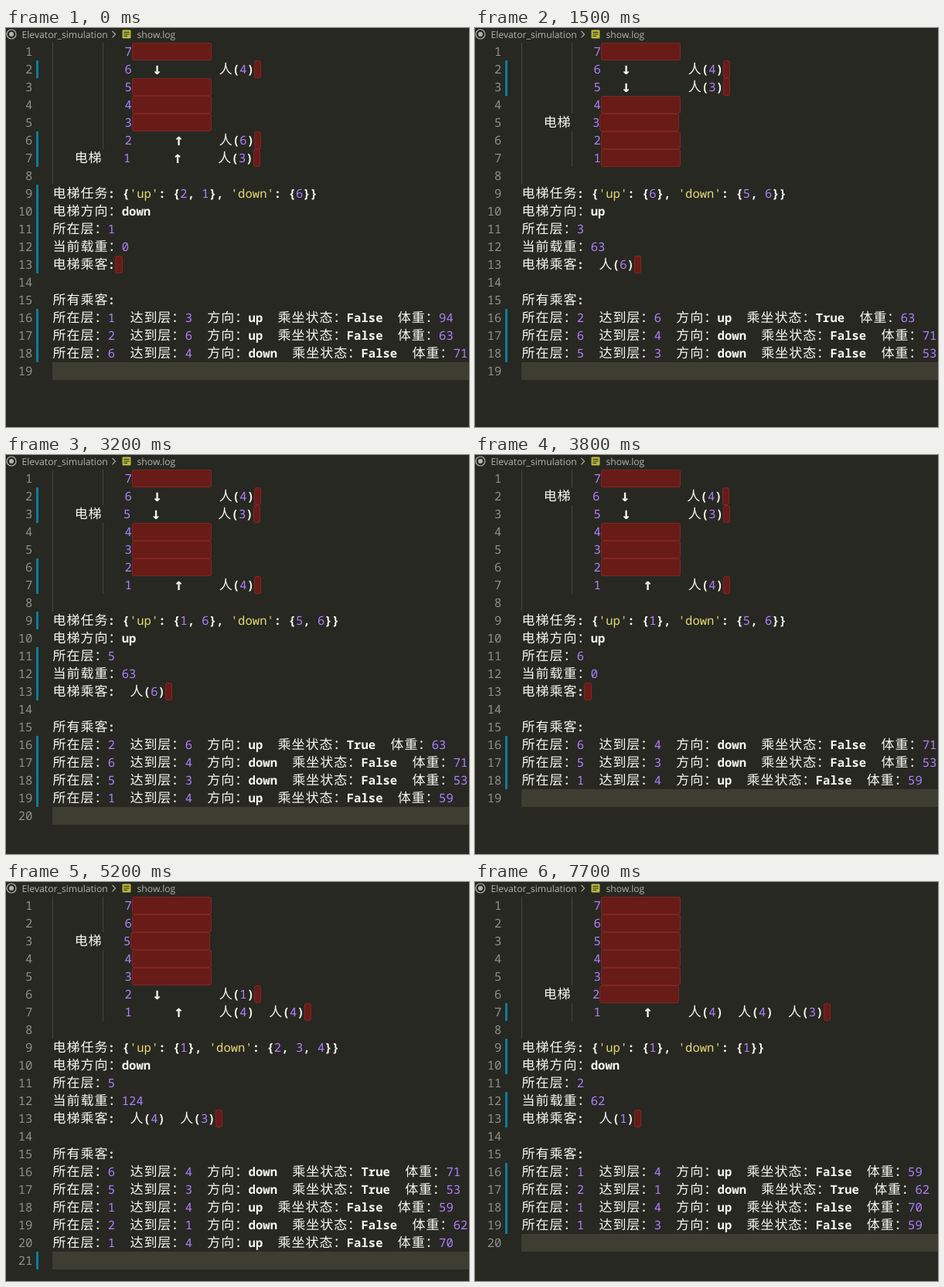
An HTML page that plays this animation: 599x517 px, repeating every 8 s.

```html
<!DOCTYPE html>
<html lang="zh-CN">
<head>
<meta charset="utf-8">
<title>show.log</title>
<style>
  html, body { margin: 0; width: 100%; height: 100%; overflow: hidden; background: #272822; }
  body { position: relative; text-rendering: geometricPrecision; }
  #crumbs { position: absolute; left: 0; top: 0; width: 599px; height: 19px; }
  #crumbs text { font: 12.2px "Open Sans", "Noto Sans", sans-serif; fill: #b4b4af; }
  #editor { position: absolute; left: 0; top: 19px; width: 599px; }
  .row {
    position: relative; height: 23px; line-height: 23px; white-space: pre;
    font-family: "Noto Sans Mono", "DejaVu Sans Mono", monospace; font-size: 15.58px;
    font-variant-ligatures: none; color: #f8f8f2;
  }
  .row > * { position: absolute; top: 0; height: 23px; }
  .num { right: 564.6px; color: #90908a; }
  .text { left: 60px; font-weight: 600; }
  .bar { left: 39px; width: 3px; background: #0c7d9d; }
  .guide { width: 1px; background: #464741; }
  .active { left: 60px; right: 0; background: #3e3d32; }
  .digit { color: #ae81ff; font-weight: 400; }
  .str { color: #e6db74; font-weight: 400; }
  .han {
    font: 300 17px/0 "Noto Sans CJK SC", "Noto Sans Mono CJK SC", "Noto Sans CJK", sans-serif;
    letter-spacing: .95px; position: relative; left: .6px;
  }
  .arrow {
    font: bold 21px/0 "DejaVu Sans Mono", monospace;
    margin: 0 -1.65px; position: relative; top: 1px;
  }
  .trail {
    display: inline-block; box-sizing: border-box; height: 23px; vertical-align: top;
    background: rgba(255, 0, 0, .3); border: 1px solid rgba(255, 100, 100, .15); border-radius: 3px;
  }
</style>
</head>
<body>
<svg id="crumbs" viewBox="0 0 599 19">
  <circle cx="7" cy="8" r="6" fill="none" stroke="#b4b4af" stroke-width="1.2"/>
  <circle cx="7" cy="8" r="3" fill="#b4b4af"/>
  <text x="20.5" y="12.5">Elevator_simulation</text>
  <path d="M137.5 4l4 4.2-4 4.2" fill="none" stroke="#b4b4af" stroke-width="1.1"/>
  <rect x="150.5" y="2.5" width="11" height="11" rx="1" fill="#b7b73b"/>
  <path d="M152.5 5.5h7M152.5 8h7M152.5 10.5h4.5" stroke="#272822" stroke-width="1.2"/>
  <text x="169.5" y="12.5">show.log</text>
</svg>
<div id="editor"></div>
<script>
const LOOP = 8000, SETTLE = 200, CELL = 9.348;

// from floor, to floor, weight
const people = {
  a: [1, 3, 94], b: [2, 6, 63], c: [6, 4, 71], d: [5, 3, 53],
  e: [1, 4, 59], f: [2, 1, 62], g: [1, 4, 70], h: [1, 3, 59]
};

// start, floor, direction, up tasks, down tasks, riders, everyone,
// change bars right after the reload, change bars once settled
const steps = [
  [0, 1, 'down', '2, 1', '6', '', 'abc', '2 6-7 9-13 16-18', '2 6-7 9-13 16-18'],
  [100, 1, 'up', '2, 3', '6', 'a', 'abc', '2 6-18', '2 6-7 9 11-13 16-18'],
  [800, 2, 'up', '3, 6', '5, 6', 'ab', 'abcd', '2 20', '2-3 9 12-13 16-19'],
  [1500, 3, 'up', '6', '5, 6', 'b', 'bcd', '2-3 16-18', '2-3 5-6 9 11-13 16-18'],
  [2300, 4, 'up', '6', '5, 6', 'b', 'bcd', '2-3 12-13 16-18', '2-4 6 9 11-13 16-18'],
  [3000, 5, 'up', '1, 6', '5, 6', 'b', 'bcde', '2-20', '2-3 6-7 9 11-13 16-19'],
  [3800, 6, 'up', '1', '5, 6', '', 'cde', '16-18', '2-3 6-7 9 11-13 16-18'],
  [4500, 6, 'down', '1', '2, 4, 5', 'c', 'cdef', '20', '2-3 6-7 9-13 16-19'],
  [5200, 5, 'down', '1', '2, 3, 4', 'cd', 'cdefg', '21', '3 6-7 9-13 16-20'],
  [6000, 4, 'down', '1', '2, 3', 'd', 'defgh', '21', '4 6-7 9-13 16-20'],
  [6700, 3, 'down', '1', '2', '', 'efgh', '16-19', '5-7 9-13 16-19'],
  [7500, 2, 'down', '1', '1', 'f', 'efgh', '18-19', '7 9-10 12-13 16-19']
];

const gap = n => ' '.repeat(n);
const badge = id => `人(${people[id][1]})`;
const heading = ([from, to]) => to > from ? 'up' : 'down';

function floorLine(n, lift, waiting) {
  const start = (n === lift ? '   电梯   ' : gap(10)) + n;
  const queue = waiting.filter(id => people[id][0] === n);
  if (!queue.length) return start + gap(11);
  const up = heading(people[queue[0]]) === 'up';
  const arrow = up ? gap(6) + '↑' + gap(5) : gap(3) + '↓' + gap(8);
  return start + arrow + queue.map(badge).join('  ') + ' ';
}

function logLines([, floor, dir, up, down, riders, all]) {
  const ids = [...all], inside = [...riders];
  const waiting = ids.filter(id => !riders.includes(id));
  const load = inside.reduce((sum, id) => sum + people[id][2], 0);
  return [
    ...[7, 6, 5, 4, 3, 2, 1].map(n => floorLine(n, floor, waiting)),
    '',
    `电梯任务: {'up': {${up}}, 'down': {${down}}}`,
    `电梯方向：${dir}`,
    `所在层：${floor}`,
    `当前载重：${load}`,
    '电梯乘客:' + inside.map(id => '  ' + badge(id)).join('') + ' ',
    '',
    '所有乘客:',
    ...ids.map(id => {
      const [from, to, weight] = people[id];
      const riding = riders.includes(id) ? 'True' : 'False';
      return `所在层：${from}  达到层：${to}  方向：${heading(people[id])}  乘坐状态：${riding}  体重：${weight}`;
    }),
    ''
  ];
}

function colour(line) {
  return line.replace(/ +$|'\w+'|\d+|[↑↓]|[\u4e00-\u9fff：]+/g, s => {
    if (s[0] === ' ') return `<span class="trail" style="width:${s.length * CELL}px"></span>`;
    const kind = s[0] === "'" ? 'str' : /\d/.test(s) ? 'digit' : /[↑↓]/.test(s) ? 'arrow' : 'han';
    return `<span class="${kind}">${s}</span>`;
  });
}

function barRows(spec) {
  const rows = new Set();
  for (const part of spec.split(' ')) {
    const [first, last = first] = part.split('-').map(Number);
    for (let n = first; n <= last; n++) rows.add(n);
  }
  return rows;
}

const guide = x => `<i class="guide" style="left:${x}px"></i>`;

function page(step, settled) {
  const bars = barRows(step[settled ? 8 : 7]);
  const lines = logLines(step);
  return lines.map((line, i) => {
    const n = i + 1;
    let html = '';
    if (n === lines.length) html += '<i class="active"></i>';
    if (n <= 8) html += guide(60);
    if (n <= 7 && !line.includes('电梯')) html += guide(125);
    if (bars.has(n)) html += '<i class="bar"></i>';
    return `<div class="row">${html}<span class="num">${n}</span><span class="text">${colour(line)}</span></div>`;
  }).join('');
}

const editor = document.getElementById('editor');
let shown = '';

function draw() {
  const t = performance.now() % LOOP;
  const step = steps.filter(s => s[0] <= t).pop();
  const settled = t >= step[0] + SETTLE;
  const key = step[0] + ':' + settled;
  if (key !== shown) {
    shown = key;
    editor.innerHTML = page(step, settled);
  }
  requestAnimationFrame(draw);
}
draw();
</script>
</body>
</html>
```
